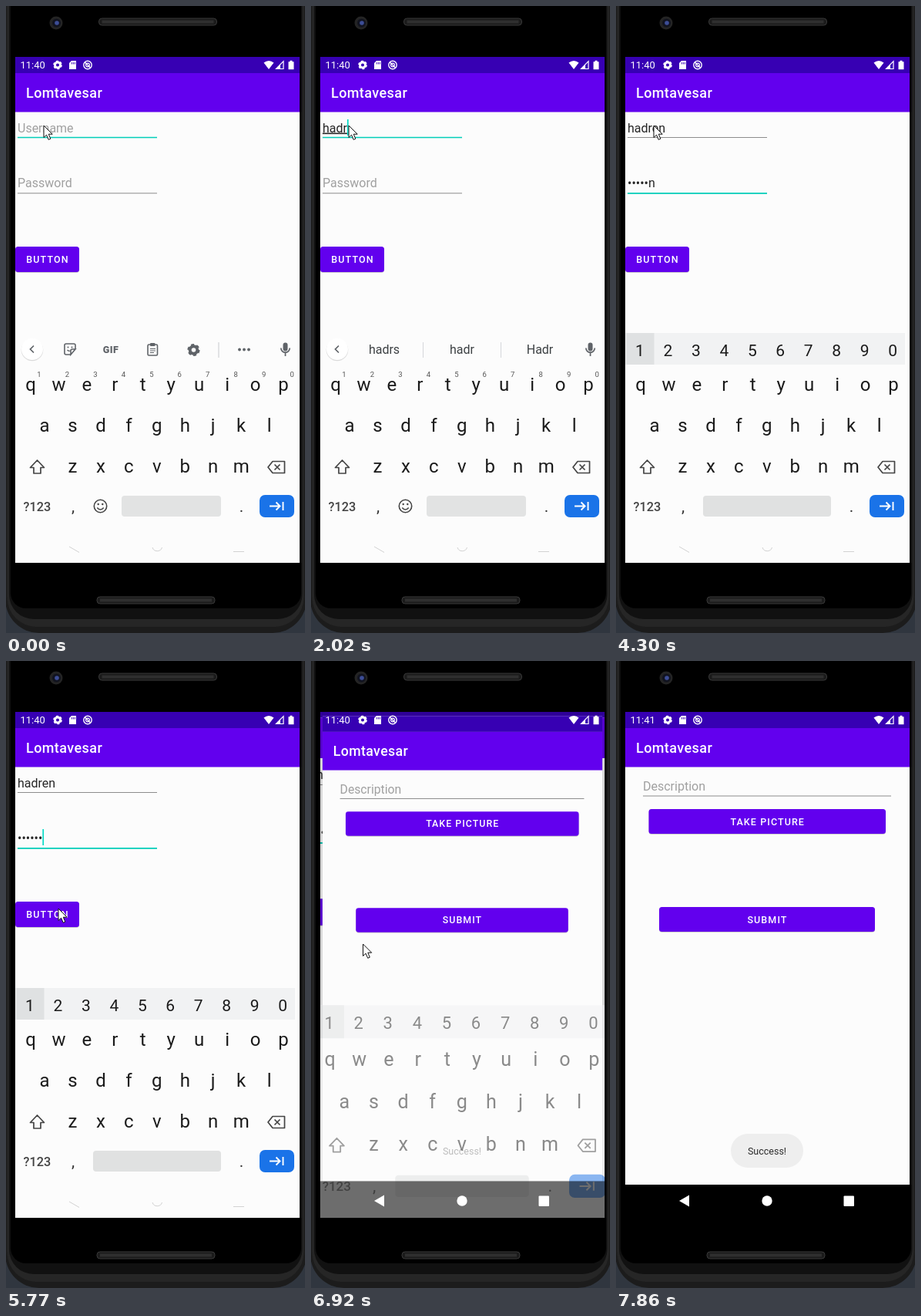
These frames come from a looping animation (388 by 813 pixels, 8 s). An HTML page:

```html
<!DOCTYPE html>
<html lang="en">
<head>
<meta charset="utf-8">
<title>Login on a phone</title>
<style>
html, body { margin: 0; width: 100%; height: 100%; overflow: hidden; background: #000; }
svg { display: block; width: 388px; height: 813px; font-family: Roboto, sans-serif; }
</style>
</head>
<body>
<svg id="stage" viewBox="0 0 388 813"></svg>
<script>
const LOOP = 8000, USER = 'hadren', TITLE = 'Lomtavesar';
const stage = document.getElementById('stage');
const pen = document.createElement('canvas').getContext('2d');

// Drawing helpers, all returning SVG markup
const rect = (x, y, w, h, fill, r = 0, more = '') =>
  `<rect x="${x}" y="${y}" width="${w}" height="${h}" rx="${r}" fill="${fill}" ${more}/>`;
const circle = (x, y, r, fill, more = '') => `<circle cx="${x}" cy="${y}" r="${r}" fill="${fill}" ${more}/>`;
const path = (d, fill, more = '') => `<path d="${d}" fill="${fill}" ${more}/>`;
const line = (d, color, w = 1.6) => path(d, 'none', `stroke="${color}" stroke-width="${w}"`);
const text = (s, x, y, size, fill, more = '') =>
  `<text x="${x}" y="${y}" font-size="${size}" fill="${fill}" ${more}>${s}</text>`;
const mid = (s, x, y, size, fill, more = '') => text(s, x, y, size, fill, 'text-anchor="middle" ' + more);
const group = (s, more) => `<g ${more}>${s}</g>`;
const zoom = (k, dy = 0) => `transform="translate(0 ${dy}) translate(196.5 394) scale(${k}) translate(-196.5 -394)"`;
const widthOf = s => (pen.font = '16px Roboto, sans-serif', pen.measureText(s).width);

// Last entry of [time, value] whose time has come
const at = (steps, t) => steps.filter(s => s[0] <= t).pop()[1];
const within = (t, spans) => spans.some(([a, b]) => t >= a && t < b);

const gear = (x, y, r, color) =>
  circle(x, y, r * .6, 'none', `stroke="${color}" stroke-width="${r * .5}"`) +
  circle(x, y, r * .87, 'none', `stroke="${color}" stroke-width="${r * .28}" stroke-dasharray="${r * .5} ${r * .411}"`);

const pill = (x, y) => rect(x, y, 153, 9, '#1b1b1b', 4, 'stroke="#393939"') +
  line(`M${x + 4} ${y + 4.5}h145`, '#2f2f2f', 4);

const phone = () =>
  rect(0, 0, 388, 813, '#30363f') +
  rect(-1, -60, 391, 873, '#1c1c1c', 44) +
  rect(1.5, -60, 385, 865, '#262626', 38) +
  rect(4, -60, 380.5, 855, '#111', 32) +
  rect(6, -60, 377, 841, '#000', 20) +
  pill(120.5, 16) + pill(118, 766) +
  circle(65, 22, 8.5, '#242424') + circle(65.5, 22, 5.5, '#11131f') + circle(66, 22, 2.8, '#3c4d96');

const bars = () => rect(12, 66, 369, 21, '#3700b3') + rect(12, 87, 369, 50.5, '#6200ee') +
  text(TITLE, 26, 119, 18, '#fff', 'font-weight="500" letter-spacing=".4"');

const status = t => text(t < 7070 ? '11:40' : '11:41', 18.5, 81, 13, '#fff') +
  gear(67, 76.5, 5.8, '#fff') +
  path('M85 71h6v11h-9v-8z', '#fff') + line('M85.5 73v2.5M87.5 73v2.5M89.4 73v2.5', '#3700b3', .9) +
  circle(106, 76.5, 5.2, 'none', 'stroke="#fff" stroke-width="1.4"') +
  circle(106, 76.5, 2.4, 'none', 'stroke="#fff" stroke-width="1.2"') + line('M102.4 73l7.2 7.2', '#fff', 1.3) +
  path('M334.5 73.5q6.5-5 13 0L341 82z', '#fff') +
  path('M350.5 81.5h9.5v-9.8zM356 75.6', 'none', 'stroke="#fff" stroke-width="1.2"') + path('M350 82l6-6v6z', '#fff') +
  path('M366.5 72.2h2v-1.4h3v1.4h2v10h-7z', '#fff');

const button = (label, x, y, w, h) => rect(x, y + 1, w, h, '#00000030', 4) + rect(x, y, w, h, '#6200ee', 3.5) +
  mid(label, x + w / 2 + .5, y + h / 2 + 4.5, 12.5, '#fff', 'font-weight="500" letter-spacing="1.1"');

const caret = (x, y) => rect(x, y, 1.7, 21, '#03dac5');
const field = (y, active) => line(`M15 ${y}H196`, active ? '#03cdb9' : '#8c8c8c', active ? 1.7 : 1);

const typedCount = (t, times) => times.filter(s => s <= t).length;
const userTimes = [1630, 1780, 1900, 2020, 2170, 2290];
const passTimes = [3020, 3170, 3320, 3470, 3620, 3740];

function login(t) {
  const onPass = t >= 2590;
  const name = USER.slice(0, typedCount(t, userTimes));
  const n = typedCount(t, passTimes);
  const secret = n && t < 5210 ? '•'.repeat(n - 1) + USER[n - 1] : '•'.repeat(n);
  const marked = onPass ? 0 : name.length < 6 || t >= 2440 ? name.length : 5;
  let s = rect(12, 66, 369, 656, '#fcfcfc') + bars() + field(170.5, !onPass) + field(242.8, onPass);
  s += name
    ? text(`<tspan text-decoration="underline">${name.slice(0, marked)}</tspan>${name.slice(marked)}`, 15, 163.5, 16, '#262626')
    : text('Username', 15, 163.5, 16, '#a0a0a0');
  s += secret ? text(secret, 15, 235, 16, '#262626') : text('Password', 15, 235, 16, '#a0a0a0');
  if (within(t, [[530, 960], [1510, 2590]])) s += caret(15 + widthOf(name), 147);
  if (within(t, [[2590, 4300], [4820, 5210], [5770, 6290]])) s += caret(15 + widthOf(secret), 218);
  s += button('BUTTON', 12, 312, 83, 33);
  const [r, a] = at([[0, [0, 0]], [6170, [22, .24]], [6290, [44, .24]], [6410, [70, .22]], [6530, [70, .12]], [6650, [70, .04]]], t);
  return s + circle(70, 326, r, '#fff', `opacity="${a}" clip-path="url(#key)"`);
}

const row = (letters, x, y, size = 24) =>
  [...letters].map((c, i) => mid(c, x + i * 36.45, y, size, '#1b1b1b')).join('');

function toolStrip(t) {
  const c = '#5f6368';
  let s = circle(34, 446, 14.3, '#0002') + circle(34, 445, 14, '#fff') + line('M36 440.5l-4.5 4.5 4.5 4.5', c, 1.7) +
    rect(359.5, 436.5, 6, 11, c, 3) + line('M356.8 443.5a5.7 5.7 0 0 0 11.4 0M362.5 449v5', c, 1.7);
  if (t >= 1780) {
    const name = USER.slice(0, typedCount(t, userTimes));
    return s + [name + 's', name, name[0].toUpperCase() + name.slice(1)]
      .map((w, i) => mid(w, 95 + i * 101, 451, 16, '#3c4043')).join('') +
      line('M145.5 436v20M246.5 436v20', '#d5d7da', 1);
  }
  s += path('M90 445v-5q0-2-2-2h-10q-2 0-2 2v10q0 2 2 2h6zl-6 7v-5q0-2 2-2z', 'none', `stroke="${c}" stroke-width="1.6"`) +
    circle(80.5, 442.5, 1, c) + circle(85.5, 442.5, 1, c) + line('M79.5 446q2 2 4 1', c, 1.3) +
    mid('GIF', 136, 449.5, 12.5, c, 'font-weight="900" letter-spacing=".5"') +
    rect(184, 439, 12.5, 14, 'none', 1.5, `stroke="${c}" stroke-width="1.6"`) + rect(187, 437, 6.5, 4, c, 1) +
    line('M187 444.5h7M187 447h7M187 449.5h5', c, 1.2) + gear(243.5, 446, 8, c) + line('M276 436v20', '#d0d2d5', 1.2);
  return s + [303, 309, 315].map(x => circle(x, 445.5, 1.9, c)).join('');
}

function keyboard(t) {
  const digits = t >= 2590, c = '#444';
  let s = digits
    ? rect(12, 424, 363, 41, '#f1f2f3') + rect(13, 424, 36.5, 41, '#dfe1e2') + row('1234567890', 31, 453.5, 21)
    : toolStrip(t) + [...'1234567890'].map((d, i) => mid(d, 43 + i * 36.45, 481, 9.5, '#555')).join('');
  s += row('qwertyuiop', 32, 499, 24) + row('asdfghjkl', 50, 551.5, 24) + row('zxcvbnm', 86.5, 604.5, 24) +
    path('M40.5 589l9 9.5h-4.5v7.5h-9v-7.5h-4.5z', 'none', `stroke="${c}" stroke-width="1.7" stroke-linejoin="round"`) +
    path('M346 590.5h15.5v15h-15.5l-6-7.5z', 'none', `stroke="${c}" stroke-width="1.7" stroke-linejoin="round"`) +
    line('M348.5 594.5l7 7M355.5 594.5l-7 7', c, 1.7) +
    text('?123', 22.5, 654.5, 16.3, '#444', 'font-weight="500"') +
    mid(',', 87, 655.5, 21, '#333') + mid('.', 305.5, 655.5, 21, '#333');
  s += digits ? rect(113, 635, 166, 27, '#e0e1e1', 4) : rect(150, 635, 129, 27, '#e2e3e3', 4) +
    circle(122.5, 648.5, 8.2, 'none', `stroke="${c}" stroke-width="1.6"`) + circle(119.7, 646, 1.2, c) +
    circle(125.3, 646, 1.2, c) + line('M118.3 650.5q4.2 5 8.4 0', c, 1.6);
  return s + rect(329, 634, 45, 29, '#1a73e8', 7) +
    line('M342 648.5h13M350.5 643.5l5 5-5 5M359.5 643v11', '#fff', 1.9) +
    line('M82 701l13 7.5M190 702a6.5 6.5 0 0 0 12.5 0M295 707.5h14', '#d2d2d2', 1);
}

const compose = () => rect(12, 66, 369, 613, '#fcfcfc') + bars() +
  text('Description', 35, 168, 16, '#a0a0a0') + line('M35 175H357', '#8c8c8c', 1) +
  button('TAKE PICTURE', 42.5, 192, 307.5, 32) + button('SUBMIT', 56, 319, 280, 32);

const toast = (back, label) => rect(149, 613, 94, 44, '#eee', 22, `opacity="${back}"`) +
  mid('Success!', 196, 640, 12.5, '#2b2b2b', `opacity="${label}"`);

const opening = [
  [6800, { old: 1.02, drop: 4, keys: .9, next: .94, show: .75, nav: .15, icons: .4, back: 0, label: 0 }],
  [6920, { old: 1.045, drop: 21, keys: .5, next: .984, show: 1, nav: .53, icons: 1, back: 0, label: .3 }],
  [7070, { old: 1.05, drop: 45, keys: .08, next: .998, show: 1, nav: .92, icons: 1, back: .8, label: .8 }],
  [7190, { old: 1, drop: 0, keys: 0, next: 1, show: 1, nav: 1, icons: 1, back: 1, label: 1 }]
];

function screen(t) {
  if (t < 6800) return login(t) + keyboard(t);
  const v = at(opening, t), top = 394 + 285 * v.next;
  return group(login(t), zoom(v.old)) + rect(12, 66, 369, 656, '#000', 0, 'opacity=".15"') +
    group(compose(), zoom(v.next) + ` opacity="${v.show}"`) +
    group(rect(12, 424, 369, 298, '#fcfcfc') + keyboard(t), zoom(v.old, v.drop) + ` opacity="${v.keys}"`) +
    rect(12, top, 369, 722 - top, '#000', 0, `opacity="${v.nav}"`) +
    group(path('M82 700l13-7.5v15z', '#fff') + circle(196, 700, 6.7, '#fff') + rect(295.5, 693.5, 13.5, 13.5, '#fff', 1),
      `opacity="${v.icons}"`) + toast(v.back, v.label);
}

const pointer = [
  [0, [49, 155]], [4580, [52, 178]], [4700, [65, 250]], [4820, [75, 308]], [4970, [74, 314]], [5090, [71, 319]],
  [5210, [68, 321]], [6410, [68, 326]], [6530, [68, 345]], [6650, [67.5, 367]], [7740, [227, 76]], [7860, null]
];
function mouse(t) {
  const p = at(pointer, t);
  return p ? path('M0 0V15.5L3.6 12.2L6.2 18.3L8.8 17.2L6.3 11.2H11.2Z', '#fff',
    `transform="translate(${p})" stroke="#111" stroke-width="1"`) : '';
}

const clips = '<defs><clipPath id="glass"><rect x="12" y="66" width="369" height="656"/></clipPath>' +
  '<clipPath id="key"><rect x="12" y="312" width="83" height="33" rx="3.5"/></clipPath></defs>';

// The picture only changes at these moments
const beats = [...new Set([530, 960, 1510, 2440, 2590, 4300, 5770, 6170, 6290,
  ...userTimes, ...passTimes, ...opening.map(s => s[0]), ...pointer.map(s => s[0])])].sort((a, b) => a - b);

let shown = -1;
function draw(now) {
  const beat = beats.filter(b => b <= (now - start) % LOOP).pop() || 0;
  if (beat !== shown) {
    shown = beat;
    stage.innerHTML = clips + phone() + group(screen(beat) + status(beat), 'clip-path="url(#glass)"') + mouse(beat);
  }
  requestAnimationFrame(() => draw(performance.now()));
}
const start = performance.now();
draw(start);
</script>
</body>
</html>
```
